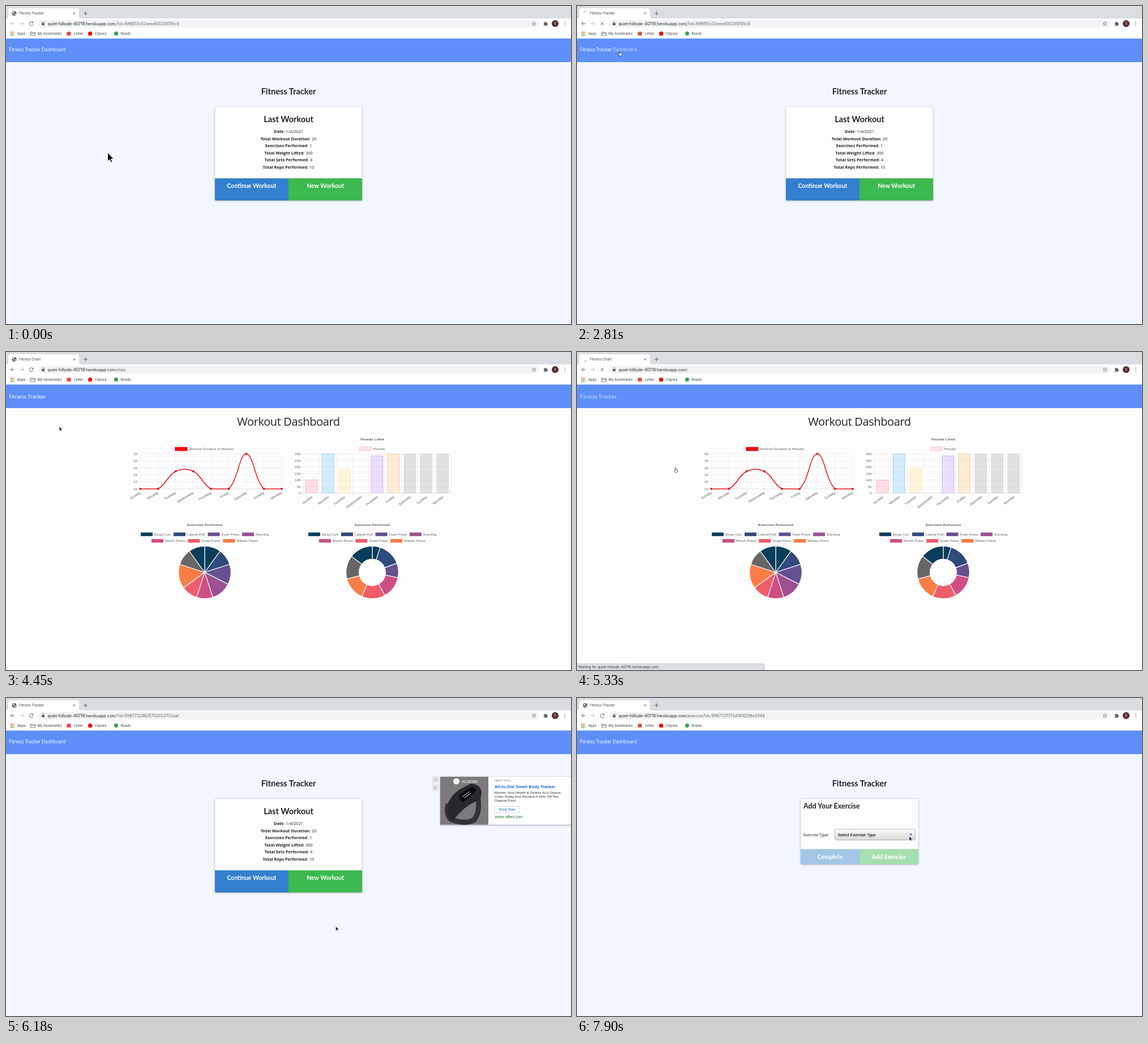
An HTML page for the animation above (8000 ms loop, 998 px wide and 561 px high).

```html
<!DOCTYPE html>
<html lang="en">
<head>
<meta charset="utf-8">
<title>Fitness Tracker</title>
<style>
html, body { margin: 0; width: 100%; height: 100%; overflow: hidden; background: #f2f6fe; }
svg { display: block; width: 998px; height: 561px; }
text { font-family: "Liberation Sans", Arial, sans-serif; white-space: pre; }
.ui { font-family: Inter, sans-serif; fill: #3c4043; }
.os { font-family: "Open Sans", sans-serif; fill: #212429; }
.lato { font-family: Lato, sans-serif; font-weight: 700; fill: #212429; }
.b { font-weight: 700; }
.mid { text-anchor: middle; }
.end { text-anchor: end; }
.w { fill: #fff; }
.g { fill: #666; }
.icon { fill: none; stroke: #5f6368; stroke-width: 1; }
.grid { stroke: #000; stroke-opacity: .1; stroke-width: .55; fill: none; }
.card { fill: #fdfdfe; stroke: #d3d6dc; stroke-width: .6; filter: drop-shadow(0 1px 1.2px #0004); }
</style>
</head>
<body>
<svg id="stage" viewBox="0 0 998 561" xmlns="http://www.w3.org/2000/svg"></svg>
<script>
const LOOP = 8000;
const HOST = 'quiet-hillside-40718.herokuapp.com';
const $ = id => document.getElementById(id);

// markup helpers
const text = (x, y, s, size, cls = '', more = '') =>
  `<text x="${x}" y="${y}" font-size="${size}" class="${cls}" ${more}>${s}</text>`;
const rect = (x, y, w, h, fill, more = '') =>
  `<rect x="${x}" y="${y}" width="${w}" height="${h}" fill="${fill}" ${more}/>`;
const dot = (x, y, r, fill, more = '') =>
  `<circle cx="${x}" cy="${y}" r="${r}" fill="${fill}" ${more}/>`;
const path = (d, more = '') => `<path d="${d}" ${more}/>`;
const group = (id, body) => `<g id="${id}">${body}</g>`;
const range = n => [...Array(n).keys()];

function browser() {
  const appDots = ['#e94235', '#e94235', '#f9ab00', '#34a853', '#4285f4', '#f9ab00', '#34a853', '#34a853', '#f9ab00'];
  return rect(0, 0, 998, 22, '#dadde2') +
    path('M0 22Q4 22 4 18V8Q4 4 8 4H125Q129 4 129 8V18Q129 22 133 22Z', 'fill="#fff"') +
    rect(0, 22, 998, 35.5, '#fff') +
    group('globe', dot(14.5, 13, 3.9, '#55585d') +
      path('M11.6 11.4l2.2-1.6 1.5 1-1.2 1.4-1.6.9zM15.2 13.2l2.2-.4-.6 2.2-1.5.9zM12.2 14l1.6.6-.2 1.4z', 'fill="#fff"')) +
    path('M14.5 9.5A3.5 3.5 0 0 1 18 13', 'id="spin" class="icon" style="stroke:#85888d;stroke-width:.8"') +
    text(23, 15.2, '', 6.1, 'ui', 'id="tab"') +
    path('M118.7 11.2l3.6 3.6m0-3.6l-3.6 3.6M137 13h7m-3.5-3.5v7', 'class="icon"') +
    path('M15 31H8.4m3.1-3.2L8.3 31l3.2 3.2', 'id="back" class="icon"') +
    path('M24.5 31h6.6m-3.1-3.2l3.2 3.2-3.2 3.2', 'class="icon" style="stroke:#babcbe"') +
    group('reload', path('M47.4 29.2A3.4 3.4 0 1 0 48 32', 'class="icon"') + path('M48.2 27.3v3h-3z', 'fill="#5f6368"')) +
    path('M41.7 28.2l5.6 5.6m0-5.6l-5.6 5.6', 'id="stop" class="icon"') +
    rect(57, 24.5, 885, 13.6, '#f1f3f4', 'rx="6.8"') +
    rect(63.2, 30, 4.8, 3.9, '#5f6368', 'rx=".5"') +
    path('M64.2 30v-1.2a1.4 1.4 0 0 1 2.8 0V30', 'class="icon" style="stroke-width:.7"') +
    `<text x="73.5" y="33.6" font-size="7" class="ui"><tspan fill="#202124">${HOST}</tspan><tspan id="url" fill="#5f6368"></tspan></text>` +
    path('M932.5 27.6l1 2.3 2.5.2-1.9 1.6.6 2.4-2.2-1.3-2.2 1.3.6-2.4-1.9-1.6 2.5-.2z', 'class="icon" style="stroke-width:.7"') +
    path('M949.8 29h2v-.6a1 1 0 0 1 2 0v.6h2v2h.5a1 1 0 0 1 0 2h-.5v2h-2.2v-.4a.9.9 0 0 0-1.8 0v.4h-2v-2.1h.4a.9.9 0 0 0 0-1.8h-.4z', 'fill="#5f6368"') +
    dot(970, 31, 6, '#5b2a2c') + text(970, 33.3, 'S', 6.2, 'ui w mid', 'style="fill:#fff"') +
    [28.2, 31, 33.8].map(y => dot(987, y, .75, '#5f6368')).join('') +
    appDots.map((c, i) => rect(7.8 + i % 3 * 2.8, 45.4 + (i / 3 | 0) * 2.8, 1.8, 1.8, c)).join('') +
    path('M43.5 46h3l1 1h4v5.2h-8zM43.5 48.3h8', 'class="icon" style="stroke-width:.8"') +
    rect(107.5, 45.5, 7, 6.5, '#e04a3f') + dot(148.7, 48.8, 3.8, '#f00a0a') + dot(194.5, 48.6, 3.6, '#34a853') +
    [[19.5, 'Apps'], [55.5, 'My bookmarks'], [119.5, 'Letter'], [157, 'Clipora'], [202.5, 'Roads']]
      .map(([x, s]) => text(x, 51, s, 6.1, 'ui')).join('');
}

function homeCard() {
  const rows = [['Date', '1/4/2021'], ['Total Workout Duration', 20], ['Exercises Performed', 1],
    ['Total Weight Lifted', 300], ['Total Sets Performed', 4], ['Total Reps Performed', 10]];
  return rect(369, 177.5, 260, 165.5, '#fdfdfe', 'class="card" rx="2"') +
    text(499, 205.3, 'Last Workout', 14.56, 'lato mid') +
    rows.map(([k, v], i) => text(499, 224 + i * 12.5, `<tspan class="b">${k}</tspan>: ${v}`, 7.35, 'os mid')).join('') +
    path('M369 304H499V343H371Q369 343 369 341Z', 'fill="#347fce"') +
    path('M499 304H629V341Q629 343 627 343H499Z', 'id="newBtn"') +
    text(434, 321.3, 'Continue Workout', 10.5, 'lato mid', 'style="fill:#fff"') +
    text(564, 321.3, 'New Workout', 10.5, 'lato mid', 'style="fill:#fff"');
}

function exerciseCard() {
  return rect(395, 177.5, 208, 115.5, '#fdfdfe', 'class="card" rx="2"') +
    text(400, 194.6, 'Add Your Exercise', 12.5, 'lato') +
    text(400, 244.2, 'Exercise Type:', 7.2, 'os', 'letter-spacing="-.13"') +
    rect(455.5, 231.5, 142, 19, 'url(#btn)', 'rx="2" stroke="#a5a5a8" stroke-width=".8"') +
    text(460.8, 243.7, 'Select Exercise Type', 7.2, '', 'fill="#111" stroke="#111" stroke-width=".12"') +
    path('M586.8 239.4h5.6l-2.8 3.2z', 'fill="#2b6fc9"') +
    path('M395 266.5H499V293H397Q395 293 395 291Z', 'fill="#a3c6e7"') +
    path('M499 266.5H603V291Q603 293 601 293H499Z', 'fill="#a6dfb0"') +
    text(447, 284, 'Complete', 10.6, 'lato mid', 'style="fill:#fff"') +
    text(551, 284, 'Add Exercise', 10.6, 'lato mid', 'style="fill:#fff"');
}

function advert() {
  const lines = ['Monitor Your Health &amp; Fitness At A Glance.', 'Order Today And Receive A 50% Off The', 'Original Price'];
  return rect(753, 138, 11.5, 12.5, '#e3e5e9') + rect(753, 152, 11.5, 12.5, '#e3e5e9') +
    path('M756.3 141.7l5 5m0-5l-5 5', 'class="icon" style="stroke:#8b9096;stroke-width:.7"') +
    path('M757 156.3l2.6 2.2-2.6 2.2z', 'fill="#8b9096"') +
    rect(767, 138.5, 233, 85, '#fdfdfe', 'class="card"') + rect(767, 139, 85, 84.5, '#7d7a7d') +
    path('M797 168Q812 172 830 164Q841 196 827 215Q811 224 786 214Q776 205 781 187', 'fill="none" stroke="#343237" stroke-width="9" stroke-linejoin="round"') +
    path('M779 200Q777 180 800 162L821 151Q838 152 840 166L838 179Q818 186 803 201Q793 211 789 218Q780 212 779 200Z', 'fill="#29272c"') +
    path('M800 171L822 157Q830 157 830 164L808 184Q799 181 800 171Z', 'fill="#0d0c10"') +
    path('M806 174l13-9m-9 11l11-8', 'stroke="#c9d2d6" stroke-width="1.3" stroke-dasharray="3 1"') +
    dot(795.5, 147, 5.5, '#f4f4f4') + text(804, 149.5, 'VELMORIN', 6.2, 'ui', 'style="fill:#f4f4f4" letter-spacing="-.35"') +
    text(863, 147, 'GADGET TOOLS', 3.6, 'g') +
    text(863, 159, 'All-in-One Smart Body Tracker', 7.4, 'b', 'fill="#1b62c9"') +
    lines.map((s, i) => text(863, 169 + i * 7.2, s, 6.25, '', 'fill="#333"')).join('') +
    rect(863, 191, 44, 11.8, '#fff', 'stroke="#b9bdc3" stroke-width=".6"') +
    text(885, 199.2, 'Shop Now', 6.4, 'mid', 'fill="#1b76c4"') +
    text(863, 212.2, 'zelnor-offers.com', 6.4, '', 'fill="#1f6b2b"');
}

// charts
const DAYS = ['Sunday', 'Monday', 'Tuesday', 'Wednesday', 'Thursday', 'Friday', 'Saturday', 'Sunday', 'Monday'];
const MINUTES = [20, 20, 25, 25, 20, 20, 30, 20, 20];
const POUNDS = [100, 300, 185, 0, 285, 300, 300, 300, 300];
const SLICES = ['#0a3d5b', '#2f4a7b', '#655090', '#9d5093', '#cf4f85', '#f05c69', '#fa7d46', '#666', '#0a3d5b'];
const BARS = ['255,99,132', '54,162,235', '255,206,86', '75,192,192', '153,102,255', '255,159,64'];
const LINE = { x: 237.3, y: 241.4, dx: 31.2, h: 61.8 };
const BAR = { x: 525.3, y: 249, dx: 28.93, h: 69.2 };

const dayLabel = (x, y, s, angle) =>
  text(0, 0, s, 6.24, 'g end', `transform="translate(${x} ${y}) rotate(${-angle})"`);

function pieLegend(dx) {
  const items = [[238, 'Bicep Curl'], [296, 'Lateral Pull'], [356.5, 'Push Press'], [417, 'Running'],
    [257, 'Bench Press'], [321.3, 'Quad Press'], [383.3, 'Military Press']];
  return text(351 + dx, 306.5, 'Exercises Performed', 6.24, 'g b mid') + items.map(([x, s], i) => {
    const y = i < 4 ? 318.5 : 330;
    return rect(x + dx, y, 21, 6.3, SLICES[i]) + text(x + dx + 24, y + 5.2, s, 6.24, 'g');
  }).join('');
}

function statsCharts() {
  const nine = range(9), ten = range(10);
  const lineGrid = nine.map(i => `M${LINE.x + i * LINE.dx} 179.6V246.5`).join('') +
    range(6).map(i => `M232 ${LINE.y - i * LINE.h / 5}H487`).join('');
  const barGrid = ten.map(i => `M${BAR.x + i * BAR.dx} 179.8V254`).join('') +
    range(7).map(i => `M520.5 ${BAR.y - i * BAR.h / 6}H785.7`).join('');
  return path(lineGrid, 'class="grid"') + path(barGrid, 'class="grid"') +
    path(`M232 ${LINE.y}H487M520.5 ${BAR.y}H785.7`, 'class="grid"') +
    range(6).map(i => text(232, LINE.y + 2.2 - i * LINE.h / 5, 20 + 2 * i, 6.24, 'g end')).join('') +
    range(7).map(i => text(520.5, BAR.y + 2.2 - i * BAR.h / 6, 50 * i, 6.24, 'g end')).join('') +
    nine.map(i => dayLabel(LINE.x + i * LINE.dx + 1.3, 249.3, DAYS[i], 31)).join('') +
    nine.map(i => dayLabel(BAR.x + (i + .5) * BAR.dx + 2, 256.2, DAYS[i], 38)).join('') +
    rect(298.3, 167.6, 22.3, 7, '#f40a12') + text(323, 173.1, 'Workout Duration In Minutes', 6.24, 'g') +
    text(647, 156, 'Pounds Lifted', 6.24, 'g b mid') +
    rect(624.5, 167.8, 21, 6.3, '#fde0e6', 'stroke="#f59fb0" stroke-width=".5"') + text(648.3, 173.1, 'Pounds', 6.24, 'g') +
    pieLegend(0) + pieLegend(296) + group('plots', '');
}

// cubic spline with tension .4, control points kept inside the plot
function linePath(k) {
  const pts = MINUTES.map((v, i) => ({ x: LINE.x + i * LINE.dx, y: (v - 20) / 10 * LINE.h }));
  const clamp = y => Math.max(0, Math.min(LINE.h, y));
  const ctrl = pts.map((p, i) => {
    const a = pts[i - 1] || p, b = pts[i + 1] || p;
    const da = Math.hypot(p.x - a.x, p.y - a.y), db = Math.hypot(b.x - p.x, b.y - p.y);
    const fa = .4 * da / (da + db), fb = .4 * db / (da + db);
    return { ax: p.x - fa * (b.x - a.x), ay: clamp(p.y - fa * (b.y - a.y)), bx: p.x + fb * (b.x - a.x), by: clamp(p.y + fb * (b.y - a.y)) };
  });
  const Y = y => LINE.y - y * k;
  const d = pts.map((p, i) => i
    ? `C${ctrl[i - 1].bx} ${Y(ctrl[i - 1].by)} ${ctrl[i].ax} ${Y(ctrl[i].ay)} ${p.x} ${Y(p.y)}`
    : `M${p.x} ${Y(p.y)}`).join('');
  return path(d, 'fill="none" stroke="#e0141c" stroke-width="1.5"') +
    pts.map(p => dot(p.x, Y(p.y), 1.9, '#e0141c')).join('');
}

function bars(k) {
  return POUNDS.map((v, i) => {
    if (!v) return '';
    const x = BAR.x + (i + .5) * BAR.dx - 10.4, h = v / 300 * BAR.h * k;
    const c = BARS[i], fill = c ? `rgba(${c},.2)` : 'rgba(0,0,0,.11)', line = c ? `rgba(${c},.75)` : 'rgba(0,0,0,.12)';
    return rect(x, BAR.y - h, 20.8, h, fill) +
      path(`M${x} ${BAR.y}v${-h}h20.8v${h}`, `fill="none" stroke="${line}" stroke-width=".55"`);
  }).join('');
}

function ring(cx, values, inner, k) {
  const R = 46.3, cy = 388.8, sum = values.reduce((a, b) => a + b);
  const at = (r, a) => `${cx + r * Math.sin(a)} ${cy - r * Math.cos(a)}`;
  let a = 0;
  return values.map((v, i) => {
    const b = a + v / sum * 2 * Math.PI * k;
    const d = `M${at(inner, a)}L${at(R, a)}A${R} ${R} 0 0 1 ${at(R, b)}L${at(inner, b)}` +
      (inner ? `A${inner} ${inner} 0 0 0 ${at(inner, a)}Z` : 'Z');
    a = b;
    return v ? path(d, `fill="${SLICES[i]}" stroke="#fff" stroke-width="1.1"`) : '';
  }).join('');
}

$('stage').innerHTML =
  '<defs><linearGradient id="btn" x2="0" y2="1"><stop stop-color="#fbfbfb"/><stop offset="1" stop-color="#d9d9da"/></linearGradient></defs>' +
  rect(0, 57, 998, 504, '#f2f6fe', 'id="page"') + browser() + rect(0, 57.4, 998, 41.6, '#5e8ffb') +
  group('tracker',
    text(5, 79.6, 'Fitness Tracker <tspan id="dash">Dashboard</tspan>', 8.5, 'os', 'style="fill:#fff" letter-spacing="-.18"') +
    text(499, 155.8, 'Fitness Tracker', 14.56, 'lato mid') +
    group('home', homeCard()) + group('exercise', exerciseCard())) +
  group('stats',
    text(5, 81.6, 'Fitness Tracker', 9.8, 'os', 'id="link" style="fill:#fff" letter-spacing="-.17"') +
    text(499, 130.2, 'Workout Dashboard', 20, 'os mid', 'letter-spacing="-.39"') +
    group('charts', statsCharts())) +
  group('ad', advert()) +
  group('status', rect(-1, 550, 10, 12, '#dcdfe3', 'id="statusBox" stroke="#b4b7bb" stroke-width=".7"') +
    text(2.5, 557.9, '', 6.3, 'ui', 'id="statusText"')) +
  group('cursor',
    path('M0 0V8.2L1.9 6.5 3.1 9.2 4.4 8.6 3.2 6H5.7Z', 'id="arrow" fill="#0a0a0a" stroke="#fff" stroke-width=".5"') +
    path('M-.7.5Q0-.4.7.5V3.2Q1.6 2.7 2 3.4Q2.8 3 3.2 3.8Q4.2 3.5 4.2 4.6V6.6L3.4 9H-.4L-2.4 5.6Q-2.2 4.6-1.3 5.2L-.7 5.7Z', 'id="hand" fill="#fff" stroke="#111" stroke-width=".75"'));

// timeline: [start, value]
const PAGE = [[0, 'home'], [2990, 'stats'], [5420, 'home'], [6950, 'exercise']];
const URL_PATH = [[0, '/?id=5ff6651c02eeed00239785c8'], [2900, '/stats'], [5330, '/'],
  [5620, '/?id=5ff677229625750023702aaf'], [6950, '/exercise'], [7240, '/exercise?id=5ff67737313d14002f6e3348']];
const WAIT = [331, `Waiting for ${HOST}...`];
const STATUS = [[0, null], [2900, WAIT], [3480, null], [4930, [138, `https://${HOST}`]], [5330, WAIT], [6000, null],
  [6270, [163.5, `https://${HOST}/exercise`]], [7140, WAIT], [7520, null]];
const LOADING = [[0, 0], [2520, 1], [3280, 0], [5230, 1], [5710, 0], [6670, 1], [7330, 0]];
const HAND = [[0, 0], [2230, 1], [2990, 0], [4730, 1], [5420, 0], [6270, 1], [6950, 0]];
// [time, x, y, scale]
const TRAIL = [[0, 179.5, 258.5, 1.9], [119, 179.5, 258.5, 1.9], [120, 255, 301, 1.9], [390, 255, 301, 1.9],
  [400, 271, 297, 1.6], [500, 268, 345, 1.2], [600, 236, 398, 1], [690, 212, 426, .9], [800, 212, 426, .9],
  [880, 262, 402, .9], [980, 345, 358, .9], [1080, 409, 337, .9], [1400, 409, 337, .9], [1650, 320, 225, .9],
  [1850, 200, 95, .9], [1980, 130, 34, .9], [2100, 96, 52, .9], [2230, 80, 86, .9], [2320, 75.5, 80, .9],
  [3400, 75.5, 80, .9], [3680, 86, 85, .9], [4260, 94.3, 131.5, .9], [4500, 94.3, 131.5, .9], [4730, 38, 78, .9],
  [5200, 38, 78, .9], [5700, 557, 559.5, .9], [6010, 557, 559.5, .9], [6270, 595.8, 321.5, .9],
  [7100, 595.8, 321.5, .9], [7520, 587, 244, .9], [LOOP, 587, 244, .9]];

const pick = (list, t) => list.filter(e => e[0] <= t).pop()[1];
const show = (id, on) => { $(id).style.display = on ? '' : 'none'; };

function cursorAt(t) {
  const i = TRAIL.findIndex(p => p[0] > t), a = TRAIL[i - 1], b = TRAIL[i];
  const u = (t - a[0]) / (b[0] - a[0]);
  return [1, 2, 3].map(n => a[n] + (b[n] - a[n]) * u);
}

let drawn = -1;
function render(t) {
  const page = pick(PAGE, t), loading = pick(LOADING, t), hand = pick(HAND, t), status = pick(STATUS, t);
  const stats = page === 'stats';
  show('stats', stats);
  show('tracker', !stats);
  show('home', page === 'home');
  show('exercise', page === 'exercise');
  show('charts', t >= 3280);
  show('ad', t >= 6090 && t < 6950);
  $('page').setAttribute('fill', stats ? '#fdfdfe' : '#f2f6fe');
  $('tab').textContent = stats ? 'Fitness Chart' : 'Fitness Tracker';
  $('url').textContent = pick(URL_PATH, t);
  $('back').style.stroke = t < 2520 ? '#babcbe' : '#5f6368';
  show('globe', !loading);
  show('reload', !loading);
  show('spin', loading);
  show('stop', loading);
  $('spin').setAttribute('transform', `rotate(${t * .36 % 360} 14.5 13)`);
  $('dash').setAttribute('fill', t >= 2230 && t < 2990 ? '#cfdcfb' : '#fff');
  $('link').style.fill = t >= 4730 ? '#cfdcfb' : '#fff';
  $('newBtn').setAttribute('fill', t >= 6270 ? '#2fa23c' : '#3cb94f');

  show('status', status);
  if (status) {
    $('statusBox').setAttribute('width', status[0] + 1);
    $('statusText').textContent = status[1];
  }

  const p = Math.max(0, Math.min(1, (t - 3349) / 1000)), k = 1 - (1 - p) ** 4;
  if (stats && k !== drawn) {
    $('plots').innerHTML = bars(k) + linePath(k) + (k ? ring(351, MINUTES, 0, k) + ring(647, POUNDS, 23.4, k) : '');
    drawn = k;
  }

  const [x, y, s] = cursorAt(t);
  $('cursor').setAttribute('transform', `translate(${x} ${y}) scale(${s})`);
  show('hand', hand);
  show('arrow', !hand);
}

const start = performance.now();
function tick() {
  render((performance.now() - start) % LOOP);
  requestAnimationFrame(tick);
}
tick();
</script>
</body>
</html>
```
